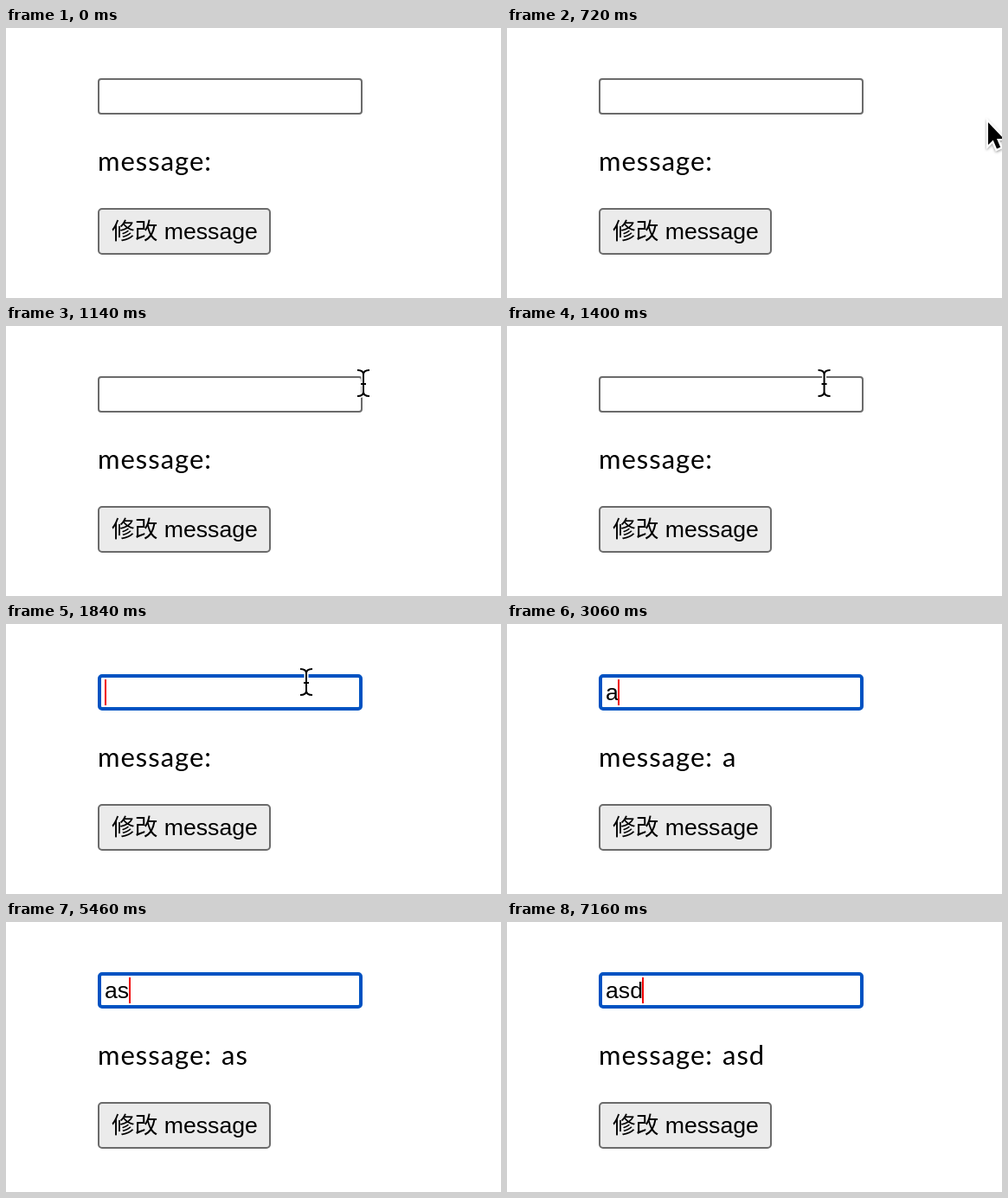
Animation of 572x312 px, one loop 8 s. Source, as an HTML page:

```html
<!DOCTYPE html>
<html lang="zh">
<head>
<meta charset="utf-8">
<title>message</title>
<style>
  html, body { margin: 0; width: 100%; height: 100%; overflow: hidden; background: #fff; }
  svg { display: block; width: 572px; height: 312px; }
  .ui { font: 26.667px "Liberation Sans", Arial, "Noto Sans CJK SC", "Noto Sans CJK", sans-serif; }
  .cjk { font-family: "Noto Sans CJK SC", "Noto Sans CJK", sans-serif; font-weight: 300; }
  .label { font: 31px Lato, sans-serif; letter-spacing: 1px; }
</style>
</head>
<body>
<svg viewBox="0 0 572 312">
  <defs>
    <path id="arrow-shape" d="M0 0V26L5.7 20.6L10 30.6L14.2 28.8L10 19H18Z"/>
    <path id="beam-shape" d="M-7-15C-3-15 0-14 0-10C0-14 3-15 7-15M0-10V10M-7 15C-3 15 0 14 0 10C0 14 3 15 7 15M-3 1H3"/>
    <filter id="soft" x="-50%" y="-50%" width="200%" height="200%">
      <feDropShadow dx="0" dy="1.5" stdDeviation="1.5" flood-opacity=".4"/>
    </filter>
  </defs>

  <rect id="field" fill="#fff"/>
  <text id="typed" class="ui" x="114" y="88"></text>
  <rect id="caret" y="64" width="2" height="30" fill="#f00000"/>

  <text class="label" x="106" y="165">message:</text>
  <text id="echo" class="label" x="249" y="165"></text>

  <rect x="107" y="209" width="198" height="52" rx="4" fill="#ebebeb" stroke="#6b6b6b" stroke-width="2"/>
  <text class="ui" x="122" y="244"><tspan class="cjk">修改</tspan> message</text>

  <g id="arrow" filter="url(#soft)">
    <use href="#arrow-shape" fill="#000" stroke="#fff" stroke-width="4"/>
    <use href="#arrow-shape" fill="#000"/>
  </g>
  <g id="beam" fill="none">
    <use href="#beam-shape" stroke="#fff" stroke-width="5"/>
    <use href="#beam-shape" stroke="#000" stroke-width="2"/>
  </g>
</svg>
<script>
  const LOOP = 8000, TICK = 40;
  const $ = id => document.getElementById(id);
  const set = (el, attrs) => {
    for (const k in attrs) el.setAttribute(k, attrs[k]);
  };
  const show = (el, on) => { el.style.display = on ? '' : 'none'; };

  // [time, text, caret x or null, focused]
  const states = [
    [0, '', null, false],
    [1840, '', 114, true],
    [2940, '', null, true],
    [3060, 'a', 128, true],
    [4460, 'a', null, true],
    [5460, 'as', 142, true],
    [6860, 'as', null, true],
    [7160, 'asd', 156, true]
  ];

  // [time, x, y]: pointer stops
  const stops = [
    [700, 556, 109], [860, 462, 72], [960, 457, 71],
    [1140, 413, 66], [1240, 411, 66], [1420, 361, 66],
    [1520, 354, 67], [1540, 347, 67]
  ];
  const holds = [860, 1140, 1420];
  const HIDE = 3060;

  const lastAt = (table, t) => table.findLastIndex(row => row[0] <= t);

  function pointer(t) {
    const i = lastAt(stops, t);
    if (i < 0 || t >= HIDE) return null;
    const [t0, x0, y0] = stops[i], next = stops[i + 1];
    if (!next || holds.includes(t0)) return [x0, y0];
    const k = Math.floor((t - t0) / TICK) * TICK / (next[0] - t0);
    return [x0 + (next[1] - x0) * k, y0 + (next[2] - y0) * k];
  }

  function draw(t) {
    const [, text, caretX, focused] = states[lastAt(states, t)];
    const w = focused ? 4 : 2;
    set($('field'), {
      x: 106 + w / 2, y: 58 + w / 2, width: 306 - w, height: 42 - w,
      rx: 3, 'stroke-width': w, stroke: focused ? '#0052c2' : '#6b6b6b'
    });
    $('typed').textContent = $('echo').textContent = text;
    show($('caret'), caretX !== null);
    if (caretX !== null) set($('caret'), { x: caretX });

    const p = pointer(t), inField = p && p[0] <= 413;
    show($('arrow'), p && !inField);
    show($('beam'), inField);
    if (p) set(inField ? $('beam') : $('arrow'), { transform: `translate(${p})` });
  }

  const start = performance.now();
  function frame() {
    draw((performance.now() - start) % LOOP);
    requestAnimationFrame(frame);
  }
  frame();
</script>
</body>
</html>
```
